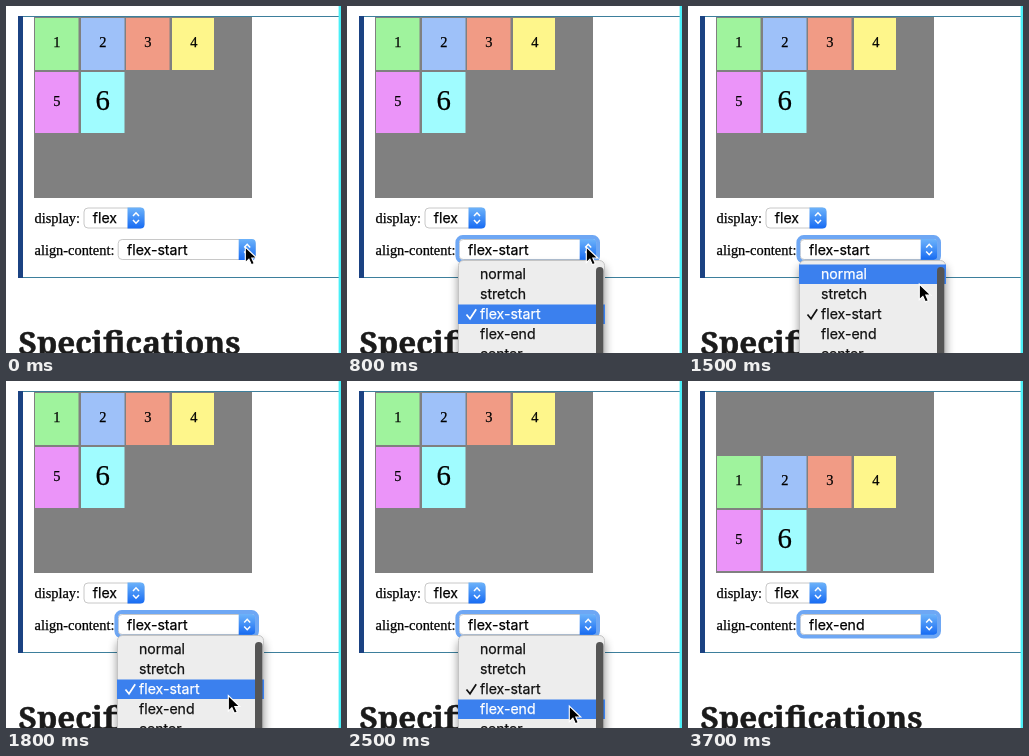
Recreate the animation shown at these times as an HTML page. Size 335 px wide and 347 px high, loop 3.8 s.

```html
<!DOCTYPE html>
<html lang="en">
<head>
<meta charset="utf-8">
<title>align-content</title>
<style>
  html, body { margin: 0; width: 100%; height: 100%; overflow: hidden; background: #fff; }
  svg { display: block; font: 14.4px "Liberation Serif", serif; }
  text { fill: currentColor; stroke: currentColor; stroke-width: .25; }
  .ui { font: 14.1px Inter, sans-serif; }
  .heading { font: bold 31.5px "Noto Serif", serif; color: #1b1b1b; stroke-width: .5; }
</style>
</head>
<body>
<svg width="335" height="347" viewBox="0 0 335 347">
  <defs>
    <linearGradient id="cap" x2="0" y2="1">
      <stop stop-color="#6db3fa"/><stop offset="1" stop-color="#176bf3"/>
    </linearGradient>
    <filter id="soft" x="-20%" y="-20%" width="140%" height="140%"><feGaussianBlur stdDeviation="5"/></filter>
  </defs>
  <path d="M12 10.5H333M12 271.5H333" stroke="#3d7f9c"/>
  <path d="M12 10h5v262h-5z" fill="#1b4282"/>
  <path d="M332.6 0h2.4v347h-2.4z" fill="#4aeff7"/>
  <path d="M28 11h218v181H28z" fill="#808080"/>
  <g id="boxes" text-anchor="middle"></g>
  <text x="28.5" y="217">display:</text>
  <text x="28.5" y="249">align-content:</text>
  <text class="heading" x="12.5" y="347.5">Specifications</text>
  <g id="selects" class="ui"></g>
  <rect id="ring" x="110.3" y="231" width="140.8" height="24.6" rx="5.5" fill="none" stroke="#6ea7f4" stroke-width="3.8"/>
  <g id="menu" class="ui">
    <rect x="111" y="260" width="147" height="110" rx="5" opacity=".4" filter="url(#soft)"/>
    <rect x="111.5" y="254.5" width="146" height="110" rx="5" fill="#ededed" stroke="#c4c4c4"/>
    <rect id="highlight" x="111" width="147" height="19.5" fill="#3b80ee"/>
    <path id="check" d="M119.5 308.5l3.5 4.2 6.2-9.5" fill="none" stroke-width="1.7"/>
    <rect x="249" y="261" width="7.5" height="110" rx="3.7" fill="#555"/>
  </g>
  <path id="cursor" d="M0 0V15.6L3.6 12.2 6.1 17.8 9 16.5 6.5 11H11.5Z" stroke="#fff" stroke-width="1.1"/>
</svg>
<script>
const $ = id => document.getElementById(id);
const LOOP = 3800, STEP = 100;
const OPTIONS = ["normal", "stretch", "flex-start", "flex-end", "center"];
const ROW = 20, MENU_TOP = 258;
// time, x, y
const PATH = [[900, 239.3, 241], [1200, 237.5, 249], [1300, 236, 256.5], [1400, 234.3, 266],
              [1800, 222.3, 314.5], [2100, 222.3, 325], [2500, 222.3, 325], [2600, 222.3, 326]];

function add(parent, tag, attrs, text = "") {
  const el = document.createElementNS("http://www.w3.org/2000/svg", tag);
  for (const key in attrs) el.setAttribute(key, attrs[key]);
  el.textContent = text;
  return parent.appendChild(el);
}

["#9ff39d", "#9ec1f9", "#f19b85", "#fef68b", "#eb94f9", "#a0fcff"].forEach((fill, i) => {
  const x = Math.round(29 + 45.6 * (i % 4)), low = i > 3;
  add($("boxes"), "rect", { x, y: low ? 66 : 12, width: i % 4 == 3 ? 42 : 43.5, height: low ? 61 : 52, fill });
  add($("boxes"), "text", { x: x + 21.8, y: i == 5 ? 104.3 : low ? 100 : 41, "font-size": i == 5 ? 28.8 : 14.4 }, i + 1);
});

function addSelect(x, y, width, value) {
  const g = $("selects"), cap = x + width - 17;
  add(g, "rect", { x: x + .5, y: y + .5, width: width - 1, height: 20, rx: 4, fill: "#fff", stroke: "#c8c8c8" });
  add(g, "path", { d: `M${cap} ${y}h13q4 0 4 4v13q0 4-4 4h-13z`, fill: "url(#cap)" });
  add(g, "path", { d: `M${cap + 5.5} ${y + 8.5}l3-3.2 3 3.2m-6 4l3 3.2 3-3.2`, fill: "none", stroke: "#fff", "stroke-width": 1.5 });
  return add(g, "text", { x: x + 9.3, y: y + 15.5 }, value);
}
addSelect(77.5, 201.5, 61, "flex");
const choice = addSelect(111.7, 233, 138, "flex-start");

const labels = OPTIONS.map((name, i) =>
  add($("menu"), "text", { x: 133, y: MENU_TOP + 15 + i * ROW }, name));

function cursorAt(t) {
  const next = PATH.findIndex(p => p[0] > t);
  if (next == 0) return PATH[0].slice(1);
  if (next < 0) return PATH.at(-1).slice(1);
  const a = PATH[next - 1], b = PATH[next], k = (t - a[0]) / (b[0] - a[0]);
  return [a[1] + (b[1] - a[1]) * k, a[2] + (b[2] - a[2]) * k];
}

function show(el, visible) {
  el.setAttribute("visibility", visible ? "visible" : "hidden");
}

function draw(now) {
  const t = Math.floor(now % LOOP / STEP) * STEP;
  const applied = t >= 2600, open = t >= 700 && !applied;

  show($("ring"), t >= 200);
  show($("menu"), open);
  show($("cursor"), t < 3400);
  $("cursor").setAttribute("transform", `translate(${cursorAt(t)})`);
  $("boxes").setAttribute("transform", `translate(0 ${applied ? 63 : 0})`);
  choice.textContent = applied ? "flex-end" : "flex-start";

  // The highlight trails the pointer by one step and blinks off on click
  const hoverY = cursorAt(t - STEP)[1];
  const hovered = t == 2400 ? -1 : hoverY < MENU_TOP ? 2 : Math.floor((hoverY - MENU_TOP) / ROW);
  show($("highlight"), open && hovered >= 0);
  $("highlight").setAttribute("y", MENU_TOP + .5 + hovered * ROW);
  labels.forEach((label, i) => label.style.color = i == hovered ? "#fff" : "#111");
  $("check").setAttribute("stroke", hovered == 2 ? "#fff" : "#111");

  requestAnimationFrame(() => draw(performance.now()));
}
draw(0);
</script>
</body>
</html>
```
